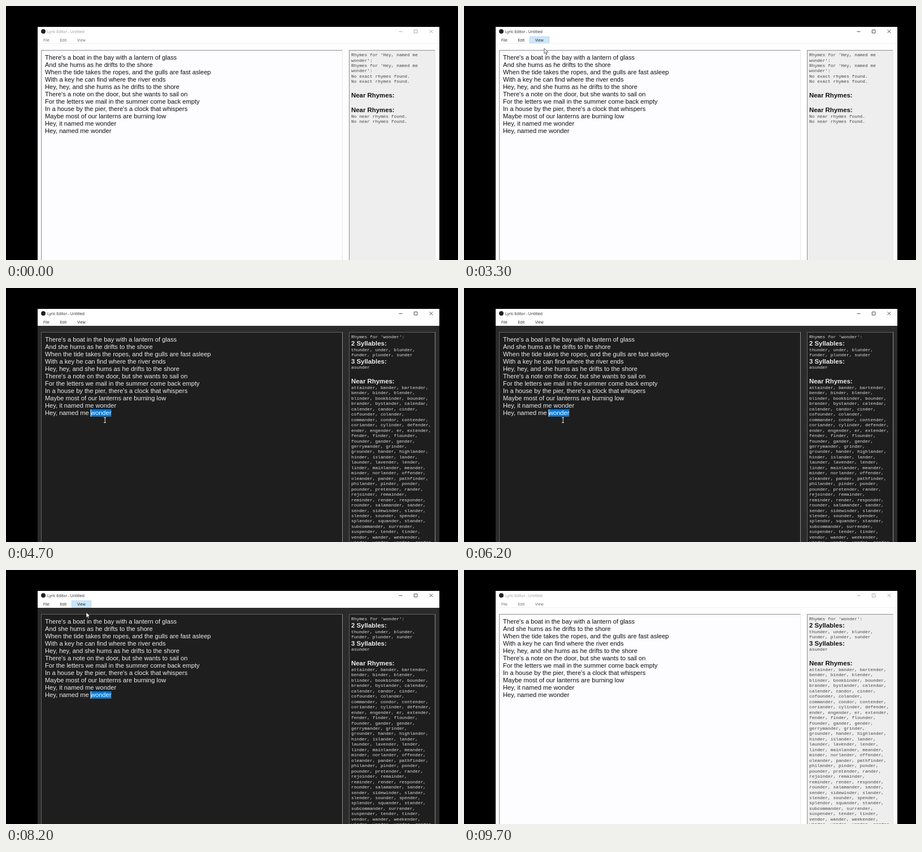
Write an HTML page with a canvas that moves like this. It is 800x450 px and loops after 9800 ms.

```html
<!DOCTYPE html>
<html lang="en">
<head>
<meta charset="utf-8">
<title>Lyric Editor</title>
<style>
  html, body { margin: 0; width: 800px; height: 450px; overflow: hidden; background: #000; }
  canvas { display: block; }
</style>
</head>
<body>
<canvas id="stage" width="800" height="450"></canvas>
<script>
const g = document.getElementById('stage').getContext('2d');
const LOOP = 9800, STEP = 100;
const UI = '6.75px "Open Sans", sans-serif';
const SANS = '11.15px "Liberation Sans", Arial, sans-serif';
const HEAD = 'bold 11.4px "Liberation Sans", Arial, sans-serif';
const MONO = '7.87px "Liberation Mono", "Courier New", monospace';

const PREFIX = 'Hey, named me ', WORD = 'wonder';
const LYRICS = [
  "There's a boat in the bay with a lantern of glass",
  'And she hums as he drifts to the shore',
  'When the tide takes the ropes, and the gulls are fast asleep',
  'With a key he can find where the river ends',
  'Hey, hey, and she hums as he drifts to the shore',
  "There's a note on the door, but she wants to sail on",
  'For the letters we mail in the summer come back empty',
  "In a house by the pier, there's a clock that whispers",
  'Maybe most of our lanterns are burning low',
  'Hey, it named me wonder',
  PREFIX + WORD
];

// A leading # marks a heading row; # alone is a tall blank row.
const LINE_RHYMES = `Rhymes for 'Hey, named me
wonder':
Rhymes for 'Hey, named me
wonder':
No exact rhymes found.
No exact rhymes found.
#
#Near Rhymes:
#
#Near Rhymes:
No near rhymes found.
No near rhymes found.`.split('\n');

const WORD_RHYMES = `Rhymes for 'wonder':
#2 Syllables:
thunder, under, blunder,
funder, plunder, sunder
#3 Syllables:
asunder
#
#Near Rhymes:
attainder, bander, bartender,
bender, binder, blender,
blinder, bookbinder, bounder,
brander, bystander, calendar,
calender, candor, cinder,
cofounder, colander,
commander, condor, contender,
coriander, cylinder, defender,
ender, engender, er, extender,
fender, finder, flounder,
founder, gander, gender,
gerrymander, grinder,
grounder, hander, highlander,
hinder, islander, lander,
launder, lavender, lender,
linder, mainlander, meander,
minder, norlander, offender,
oleander, pander, pathfinder,
philander, pinder, ponder,
pounder, pretender, rander,
rejoinder, remainder,
reminder, render, responder,
rounder, salamander, sander,
sender, sidewinder, slander,
slender, sounder, spender,
splendor, squander, stander,
subcommander, surrender,
suspender, tender, tinder,
vendor, wander, weekender,
winder, wonder, yonder, zander`.split('\n');

const LIGHT = { body: '#fefefe', page: '#fdfcfe', side: '#eeeeee', text: '#111', mono: '#444',
                near: '#8c8c8c', far: '#e6e6e6', caret: '#000' };
const DARK = { body: '#2b2b2b', page: '#1e1e1f', side: '#1e1e1f', text: '#ececec', mono: '#dedede',
               near: '#626262', far: '#8e8e8e', caret: '#fff' };

// Pointer path: time, x, y
const PATH = [
  [2000, 742, 170], [2100, 500, 120], [2200, 220, 75], [2300, 134, 59], [3200, 134, 59],
  [3300, 142, 75], [3600, 142, 75], [4000, 150, 150], [4300, 166, 238], [4500, 175, 234],
  [6500, 175, 234], [6900, 160, 150], [7300, 134, 59], [8000, 134, 59], [8100, 142, 75],
  [8400, 142, 75], [8500, 136, 86], [8800, 171, 230], [9700, 171, 230]
];

function rect(x, y, w, h, color) {
  g.fillStyle = color;
  g.fillRect(x, y, w, h);
}

function text(s, x, y, font, color) {
  g.font = font;
  g.fillStyle = color;
  g.fillText(s, x, y);
}

function box(x, y, w, fill, c) {
  rect(x, y, w, 450 - y, fill);
  rect(x, y, w, 1, c.near);
  rect(x, y, 1, 450 - y, c.near);
  rect(x + w - 1, y, 1, 450 - y, c.far);
}

function drawChrome(active, hover) {
  rect(56, 37, 711, 30, '#fff');
  const ink = active ? '#222' : '#969696';
  g.fillStyle = '#222';
  g.beginPath();
  g.arc(66, 45, 4, 0, 7);
  g.fill();
  text('Lyric Editor - Untitled', 73, 47.8, UI, ink);
  if (hover) {
    rect(116, 54, 35, 12.5, '#a5d3f5');
    rect(116.6, 54.6, 33.8, 11.3, '#cce6fb');
  }
  const menuInk = active ? '#222' : '#666';
  text('File', 66, 62.8, UI, menuInk);
  text('Edit', 95.3, 62.8, UI, menuInk);
  text('View', 126, 62.8, UI, menuInk);
  g.strokeStyle = ink;
  g.lineWidth = 0.8;
  g.beginPath();
  g.moveTo(695.5, 45.4); g.lineTo(701.5, 45.4);
  g.rect(722.3, 42.3, 5.6, 5.6);
  g.moveTo(749.5, 42.2); g.lineTo(755.3, 48);
  g.moveTo(755.3, 42.2); g.lineTo(749.5, 48);
  g.stroke();
}

function drawEditor(c, selected, caret) {
  box(62, 78, 534, c.page, c);
  LYRICS.forEach((s, i) => text(s, 69, 95.4 + 13 * i, SANS, c.text));
  const x = 69 + g.measureText(PREFIX).width;
  if (selected) {
    rect(x, 215, g.measureText(WORD).width, 13, '#0078d7');
    text(WORD, x, 225.4, SANS, '#fff');
  }
  if (caret === 'end') rect(68.6, 228, 1, 13, c.caret);
  if (caret === 'word') rect(x - 0.3, 215, 1, 13, c.caret);
}

function drawSide(c, rows) {
  box(607, 78, 153, c.side, c);
  let y = 82;
  for (const row of rows) {
    const head = row[0] === '#';
    if (head) text(row.slice(1), 611, y + 10.4, HEAD, c.text);
    else text(row, 611, y + 7.1, MONO, c.mono);
    y += head ? 13 : 9.46;
  }
}

function pointerAt(t) {
  const i = PATH.findIndex(p => p[0] > t);
  if (i < 1) return null;
  const [t0, x0, y0] = PATH[i - 1], [t1, x1, y1] = PATH[i];
  const k = (t - t0) / (t1 - t0);
  return [x0 + (x1 - x0) * k, y0 + (y1 - y0) * k];
}

function drawPointer([x, y], c) {
  g.save();
  g.translate(x, y);
  g.beginPath();
  if (y > 79 && x > 62 && x < 596) {
    g.moveTo(-2, -4.5); g.lineTo(2, -4.5);
    g.moveTo(0.3, -4.5); g.lineTo(0.3, 4.5);
    g.moveTo(-2, 4.5); g.lineTo(2, 4.5);
    g.strokeStyle = c.caret;
    g.lineWidth = 0.9;
  } else {
    for (const [px, py] of [[0, 0], [0, 9.4], [2.1, 7.4], [3.7, 10.9], [5.1, 10.3], [3.6, 6.9], [6.5, 6.7]])
      g.lineTo(px, py);
    g.closePath();
    g.fillStyle = '#fff';
    g.fill();
    g.strokeStyle = '#222';
    g.lineWidth = 0.7;
  }
  g.stroke();
  g.restore();
}

function draw(t) {
  const during = (a, b) => t >= a && t < b;
  const c = during(3400, 8300) ? DARK : LIGHT;
  const active = during(1600, 9700);
  const selected = during(4600, 9700);
  const hover = during(2300, 3400) || during(7300, 8300);
  // The theme switch restarts the caret's blink.
  const blink = (t - (t < 8300 ? 1600 : 7700)) % 900 < 600;
  const caret = active && blink && (selected ? 'word' : 'end');

  rect(0, 0, 800, 450, '#000');
  rect(56, 37, 711, 413, c.body);
  drawChrome(active, hover);
  if (c === LIGHT) rect(56, 66, 711, 1, '#f1f1f1');
  drawEditor(c, selected, caret);
  drawSide(c, t < 4700 ? LINE_RHYMES : WORD_RHYMES);
  const p = pointerAt(t);
  if (p) drawPointer(p, c);
}

const start = performance.now();
function tick() {
  const t = (performance.now() - start) % LOOP;
  draw(Math.floor(t / STEP) * STEP);
  requestAnimationFrame(tick);
}
tick();
</script>
</body>
</html>
```
